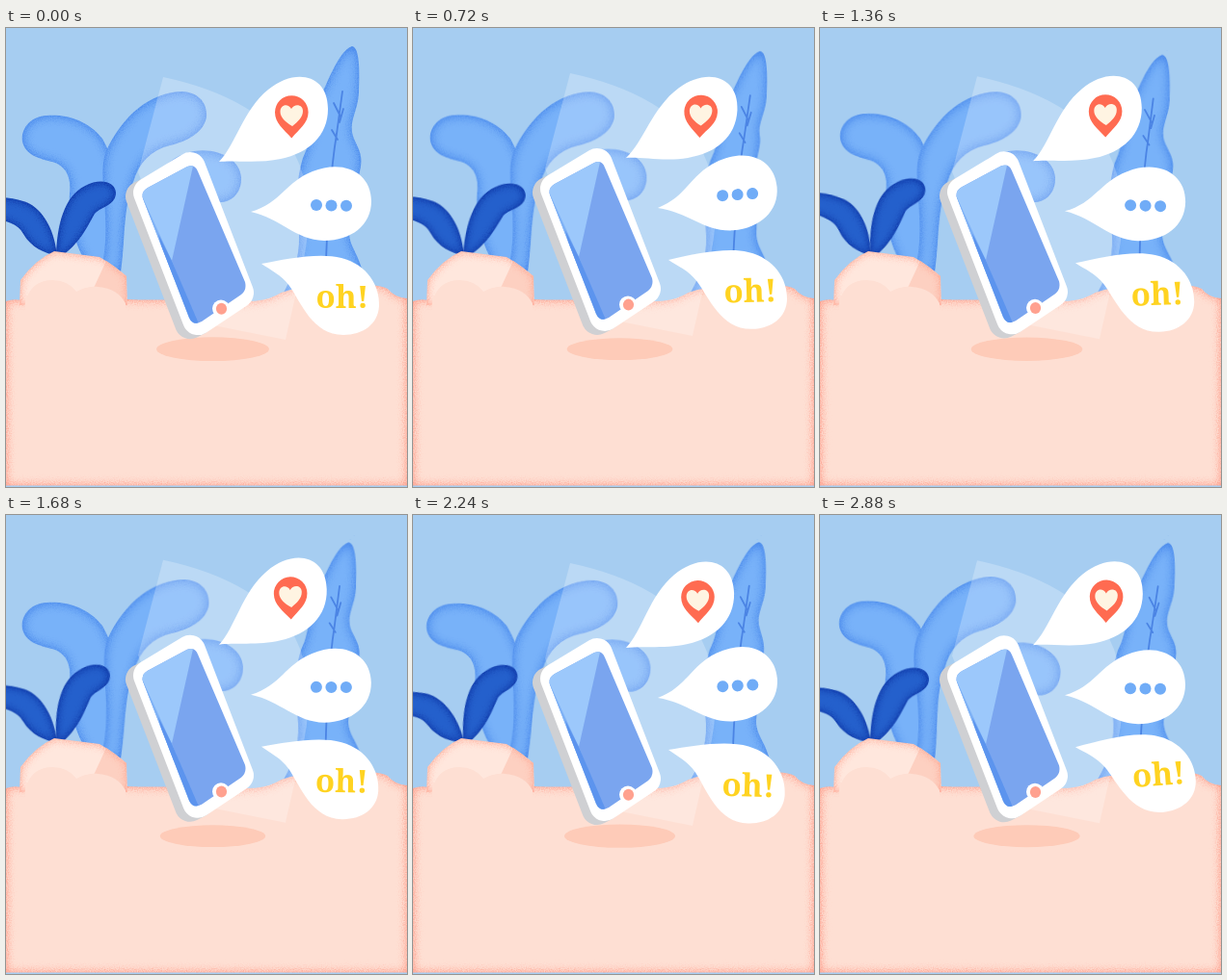
Recreate the animation shown at these times as an HTML page. Size 416x477 px, loop 2.96 s.

```html
<!DOCTYPE html>
<html lang="en">
<head>
<meta charset="utf-8">
<title>Floating phone</title>
<style>
  html, body { margin: 0; width: 100%; height: 100%; overflow: hidden; background: #a6cdf1; }
  svg { display: block; width: 100%; height: 100%; }
  .back { fill: #78b2f9; filter: url(#rimBlue); }
  .dark { fill: #2460cc; filter: url(#rimNavy); }
  .round { stroke-linejoin: round; }
  .oh { font: 900 33px "Noto Serif", "Liberation Serif", serif; fill: #ffd321; }
</style>
</head>
<body>
<svg viewBox="0 0 416 477" preserveAspectRatio="xMidYMid meet">
  <defs id="defs">
    <clipPath id="screenClip">
      <path d="M142 177Q140 170 147 166L188 144Q196 141 199 149L248 264Q250 272 244 277L203 305Q194 310 190 301Z"/>
    </clipPath>
  </defs>
  <rect width="416" height="477" fill="#a6cdf1"/>

  <!-- foliage -->
  <path id="leafRight" class="back" d="M142 205C146 160 165 133 195 128C222 124 243 138 244 155C245 172 233 182 220 181C200 180 170 180 150 205Z"/>
  <path id="leafLeft" class="back" d="M118 254C122 200 120 150 100 115C85 95 60 89 42 91C25 92 15 105 17 118C20 132 35 136 48 139C62 143 68 155 66 172C64 205 75 235 90 254Z"/>
  <path id="leafMid" class="back" d="M98 254C112 200 93 155 104 128C120 92 150 66 183 66C200 67 209 78 208 92C206 108 188 118 170 122C150 127 138 140 132 160C121 190 124 220 119 254Z"/>
  <g id="tall">
    <path id="tallShape" class="back"/>
    <path d="M349 66L343 110Q334 165 331 270M340 78L347 92M338 106L344 116M350 84L346 98" fill="none" stroke="#4b84e4" stroke-width="1.8" stroke-linecap="round"/>
  </g>
  <path id="darkLeft" class="dark" d="M53 237C50 205 35 185 18 180C6 176 -6 175 -22 178L-22 196C0 200 12 203 18 214C26 228 40 234 53 237Z"/>
  <path id="darkRight" class="dark" d="M52 237C53 205 60 175 82 164C97 156 113 159 114 171C114 184 100 185 92 193C85 205 78 222 58 237Z"/>

  <!-- ground and stone -->
  <path fill="#fedfd3" filter="url(#rimPink)" d="M0 284Q8 281 16 283L125 282Q150 283 180 282Q225 288 250 284Q268 284 280 278Q295 269 318 270L372 268Q386 266 396 271Q403 280 416 281V475.5H0Z"/>
  <g filter="url(#rimPinkThin)">
    <path fill="#ffe7dd" d="M14 288L15 262Q30 241 50 232L97 238Q113 247 125 258L126 288Z"/>
    <path fill="#fdd0c1" d="M104 242L125 258V288H78L92 268Z"/>
  </g>
  <path fill="#fedfd3" d="M20 300V284Q27 262 48 262Q64 262 73 274Q84 268 96 269Q116 271 124 286V300Z"/>
  <ellipse id="shadow" cx="214.5" cy="333.7" rx="58" ry="12.3" fill="#fecbb8"/>

  <!-- phone -->
  <g id="phone">
    <path fill="#fff" fill-opacity=".24" d="M163 51Q262 72 300 132Q322 175 309 240L290 324L200 306L137 150Z"/>
    <g class="round" stroke-width="32">
      <path fill="#cfd0d3" stroke="#cfd0d3" d="M140 175L148 171L199 303L191 307Z"/>
      <path fill="#fff" stroke="#fff" d="M148 171L191 145L241 275L199 303Z"/>
    </g>
    <g clip-path="url(#screenClip)">
      <path fill="#7aa5ef" d="M130 130H260V320H130Z"/>
      <path fill="#9cc8fb" d="M130 130H197L172 242L200 312H130Z"/>
      <path fill="#7fb2f6" d="M130 150L172 242L178 260H130Z"/>
      <path fill="#5c94ee" d="M158 214L172 242L202 312H180Z"/>
    </g>
    <circle cx="223" cy="291.5" r="9" fill="#fff"/>
    <ellipse cx="223.5" cy="291.7" rx="5.6" ry="6" fill="#ffa18f"/>
  </g>

  <!-- speech bubbles -->
  <g id="bubblePin">
    <path fill="#fff" d="M221 139C238 122 246 85 272 64C300 41 334 48 334 84C334 112 314 130 285 136C262 141 235 137 221 139Z"/>
    <path fill="#ff6b51" d="M296.3 114.500C288 105 279 99 279 87.500A17.300 17.300 0 0 1 313.600 87.500C313.600 99 304 105 296.300 114.500Z"/>
    <path fill="#fff4e2" d="M297 102C290 98 284.500 93 284.500 87C284.500 79 293 78 296 84C299 78 308 79 308 86C308 93 303 97 297 102Z"/>
  </g>
  <g id="bubbleDots">
    <path fill="#fff" d="M254 191C285 182 290 160 318 149C350 136 379 150 379 180C379 205 358 221 330 221C300 220 285 198 254 191Z"/>
    <g fill="#70acf7">
      <circle cx="322" cy="184" r="6"/><circle cx="337.500" cy="184.300" r="6"/><circle cx="353" cy="184.600" r="6"/>
    </g>
  </g>
  <g id="bubbleOh">
    <path fill="#fff" d="M265 245C290 240 325 233 348 239C375 246 388 268 387 289C386 308 370 319 350 319C318 319 306 285 294 268C285 256 275 252 265 245Z"/>
    <text class="oh" x="349" y="291" text-anchor="middle">oh!</text>
  </g>
</svg>
<script>
const LOOP = 2960, STEP = 80;
const $ = id => document.getElementById(id);

// Grainy shading that creeps inward from a shape's edge.
const rim = (id, color, blur, grain, gain) => `
  <filter id="${id}" x="-10%" y="-10%" width="120%" height="120%" color-interpolation-filters="sRGB">
    <feComponentTransfer in="SourceAlpha"><feFuncA type="table" tableValues="1 0"/></feComponentTransfer>
    <feGaussianBlur stdDeviation="${blur}" result="edge"/>
    <feTurbulence type="fractalNoise" baseFrequency=".8" numOctaves="1" seed="4" result="noise"/>
    <feDisplacementMap in="edge" in2="noise" scale="${grain}" xChannelSelector="R" yChannelSelector="G"/>
    <feComponentTransfer result="shade"><feFuncA type="linear" slope="${gain}"/></feComponentTransfer>
    <feFlood flood-color="${color}"/>
    <feComposite in2="shade" operator="in"/>
    <feComposite in2="SourceGraphic" operator="atop" result="tint"/>
    <feComposite in="tint" in2="SourceGraphic" operator="atop"/>
  </filter>`.replace(/<feComposite in2="SourceGraphic"[^>]*>\s*<feComposite[^>]*>/,
    '<feComposite in2="SourceGraphic" operator="atop"/>');

$('defs').insertAdjacentHTML('beforeend',
  rim('rimBlue', '#4585ea', 6, 9, 1.25) +
  rim('rimNavy', '#0c35a6', 5, 8, 1.4) +
  rim('rimPink', '#ff9f8c', 5, 12, 1.2) +
  rim('rimPinkThin', '#ffa692', 4, 9, 1.1));

// Drifting values: smooth curves through a few poses.
const TIMES = [0, 400, 720, 1360, 2000, 2560, 2880];
function drift(values, t) {
  let i = 0;
  while (i < TIMES.length - 2 && t >= TIMES[i + 1]) i++;
  const slope = k => {
    const a = Math.max(k - 1, 0), b = Math.min(k + 1, TIMES.length - 1);
    return (values[b] - values[a]) / (TIMES[b] - TIMES[a]);
  };
  const span = TIMES[i + 1] - TIMES[i], u = (t - TIMES[i]) / span, v = 1 - u;
  return v * v * (1 + 2 * u) * values[i] + u * u * (3 - 2 * u) * values[i + 1]
    + span * u * v * (v * slope(i) - u * slope(i + 1));
}

// id, pivot x, pivot y, angles, whether it floats with the phone
const SWAYS = [
  ['leafLeft', 108, 250, [0, 1.7, .4, 1.7, -1.7, .4, 1.3]],
  ['leafMid', 115, 250, [0, 1, .3, .2, 1.5, .9, -1.7]],
  ['leafRight', 120, 250, [0, -1.7, -1, 0, 2, .8, 3.5]],
  ['darkLeft', 53, 234, [0, -2, 1, 5, -7, -6, -3]],
  ['darkRight', 53, 234, [0, 3, 2.6, -4.2, -5.5, -3.5, -.9]],
  ['bubblePin', 221, 139, [0, .4, 2.7, -.2, -1.7, .6, .9], true],
  ['bubbleDots', 254, 191, [0, -4.2, -4.9, .7, -3.1, -4.3, 0], true],
  ['bubbleOh', 265, 245, [0, .7, -1.4, -1.7, 3.1, -1.7, -4.1], true],
];
const TIP_X = [0, 2, 1, -4, -2, 2, 2];
const TIP_Y = [0, 3, 5, 9, 9.5, 9, 10];
const BULGE = [0, -9, -14, 0, -2, -7, 0];

function tallLeaf(b) {
  return `M359 19C367 20 367 45 366 68C365 85 357 95 359 108
    C361 ${120 + b / 4} ${371 + b} 128 ${368 + b} 144C${364 + b} 165 358 190 356 212
    C356 232 372 236 374 282H284C296 262 305 240 304 215
    C302 185 300 160 308 135C318 115 316 95 322 80C332 62 344 24 359 19Z`;
}

function draw(t) {
  const bob = 2.5 * Math.cos(2 * Math.PI * (t + 60) / 1250) - 2.3;
  for (const [id, x, y, angles, floats] of SWAYS)
    $(id).setAttribute('transform', `translate(0 ${floats ? bob : 0}) rotate(${drift(angles, t)} ${x} ${y})`);
  $('phone').setAttribute('transform', `translate(0 ${bob})`);
  $('shadow').setAttribute('rx', 58.3 + bob * .85);
  $('shadow').setAttribute('ry', 12.4 + bob * .25);

  const base = 275, height = base - 19;
  const stretch = 1 - drift(TIP_Y, t) / height, lean = -drift(TIP_X, t) / height;
  $('tall').setAttribute('transform', `matrix(1 0 ${lean} ${stretch} ${-lean * base} ${base * (1 - stretch)})`);
  $('tallShape').setAttribute('d', tallLeaf(drift(BULGE, t)));
}

const start = performance.now();
let shown = -1;
function tick() {
  const t = Math.floor((performance.now() - start) % LOOP / STEP) * STEP;
  if (t !== shown) draw(shown = t);
  requestAnimationFrame(tick);
}
tick();
</script>
</body>
</html>
```
